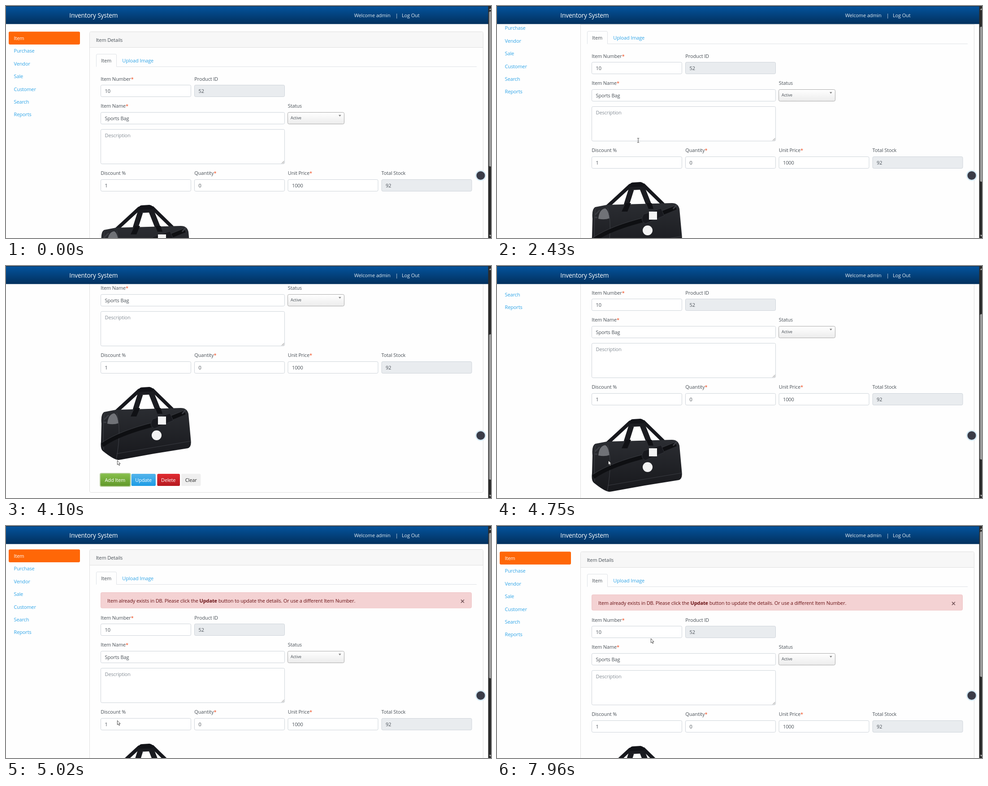
These frames come from a looping animation (1082x518 px, 8 s). An HTML page:

```html
<!DOCTYPE html>
<html lang="en">
<head>
<meta charset="utf-8">
<title>Inventory System</title>
<style>
html, body { margin: 0; width: 100%; height: 100%; overflow: hidden; background: #fefefe; }
svg { display: block; width: 1082px; height: 518px; }
text { font: 11px "Open Sans", "Noto Sans", sans-serif; letter-spacing: -.0127em; fill: #495057; white-space: pre; }
.link { fill: #2fa4e7; }
.white { fill: #fff; }
.pale { fill: #e4ebf2; }
.hint { fill: #868e96; }
.star { fill: #ee4416; }
.dark { fill: #222; }
.title { font-size: 13.75px; fill: #fff; }
.small { font-size: 8.9px; }
.status { font-size: 8.25px; fill: #d4d4d4; }
.warn { fill: #670f12; }
.warn tspan { font-weight: 700; }
</style>
</head>
<body>
<svg id="stage" viewBox="0 0 1082 518"></svg>
<script>
const LOOP = 8000, ALERT_HEIGHT = 47, CLICK = 3790, REPLY = 3850;

// [time, value], each value held until the next
const scrollKeys = [[0, 0], [2430, 51], [2500, 150], [2570, 221], [4750, 150],
  [4820, 86], [4880, 43], [4950, 18], [5010, 5], [5080, 0]];
const statusKeys = [[0, 0], [1720, .5], [1780, .8], [1850, 1], [2100, .8], [2160, .5], [2230, .2], [2290, 0]];

// [start, end, steps, pointer, ...points], going on from the previous point
const moves = [
  [190, 190, 1, 'arrow', [925, 423]],
  [260, 330, 2, 'arrow', [624, 260]],
  [660, 860, 4, 'arrow', [203, 92]],
  [1180, 1310, 3, 'arrow', [149, 77]],
  [1380, 1580, 4, 'hand', [237, 121.5]],
  [1780, 1910, 3, 'arrow', [302, 230]],
  [2100, 2290, 4, 'beam', [315, 300]],
  [2900, 3230, 6, 'arrow', [305, 400], [268, 460]],
  [3300, 3430, 3, 'hand', [250, 434]],
  [REPLY, REPLY, 1, 'arrow', [248, 434]],
  [5220, 6010, 12, 'arrow', [300, 300], [400, 134], [445, 183.5]],
  [6080, 6540, 8, 'arrow', [430, 160], [510, 166], [588, 200]],
  [6810, 7090, 5, 'arrow', [660, 180], [728, 186]],
  [7290, 7430, 3, 'arrow', [353, 253]],
  [7900, 7960, 2, 'arrow', [343, 251]]
];

const text = (x, middle, s, cls = '') => `<text x="${x}" y="${middle + 4}" class="${cls}">${s}</text>`;
const rect = (x, y, w, h, attrs) => `<rect x="${x}" y="${y}" width="${w}" height="${h}" ${attrs}/>`;
const path = (d, attrs) => `<path d="${d}" ${attrs}/>`;
const fade = (id, top, bottom) => `<linearGradient id="${id}" x2="0" y2="1"><stop stop-color="${top}"/>
  <stop offset="1" stop-color="${bottom}"/></linearGradient>`;
const label = (x, y, s, star) => text(x, y, s + (star ? '<tspan class="star">*</tspan>' : ''));
const box = (x, y, w, h, fill = '#fff') => rect(x + .5, y + .5, w - 1, h - 1, `rx="2.8" fill="${fill}" stroke="#ced4da"`);
const field = (x, y, w, s, locked) => box(x, y, w, 27, locked ? '#e9ecef' : '#fff') + text(x + 9.5, y + 13.5, s);
const button = (x, w, textX, s, fill, cls = 'white') => rect(x, 464, w, 27, `rx="2.8" fill="${fill}"`) + text(textX, 477.5, s, cls);

const sidebar = rect(6, 57.3, 159, 28.6, 'rx="2.8" fill="#ff6707"') +
  ['Item', 'Purchase', 'Vendor', 'Sale', 'Customer', 'Search', 'Reports']
    .map((s, i) => text(17.5, 72 + i * 28.4, s, i ? 'link' : 'white')).join('');

const card = rect(186.5, 57.5, 878, 622, 'id="card" rx="3" fill="#fefefe" stroke="#dfdfdf"') +
  path('M187 92V60.5Q187 58 190 58H1061Q1064 58 1064 60.5V92Z', 'fill="#f7f7f7"') +
  path('M187 92.5H1064', 'stroke="#dfdfdf"') + text(200.7, 75.5, 'Item Details') +
  path('M201 135.5H201.5V110Q201.5 107.5 204 107.5H244Q246.5 107.5 246.5 110V135.5H1050', 'fill="none" stroke="#dee2e6"') +
  text(212.3, 122.3, 'Item') + text(259.3, 122.3, 'Upload Image', 'link');

const notice = `<g id="notice">${rect(211.5, 153.5, 827, 34.6, 'rx="2.8" fill="#f4d2d3" stroke="#efc3c5"')}
  ${text(226, 171.5, 'Item already exists in DB. Please click the <tspan>Update</tspan> button to update the details. Or use a different Item Number.', 'warn')}
  ${path('M1015 169.5l7 7m0 -7l-7 7', 'stroke="#75565a" stroke-width="1.6"')}</g>`;

const inputs = label(211.3, 162.5, 'Item Number', 1) + field(211, 176, 202, '10') +
  label(420.3, 162.5, 'Product ID') + field(420, 176, 202, '52', 1) +
  label(211.3, 223.3, 'Item Name', 1) + field(211, 237, 411, 'Sports Bag') +
  label(628.8, 223.3, 'Status') +
  rect(628.5, 237.5, 126, 26, 'rx="3" fill="url(#select)" stroke="#aaa"') + text(635, 249.3, 'Active', 'small') +
  path('M742 243h5.6l-2.8 4z', 'fill="#888"') +
  box(211, 275, 411, 78) + text(220.5, 288.7, 'Description', 'hint') +
  path('M615 351.5l5.5 -5.5M618 351.5l2.5 -2.5', 'stroke="#555" stroke-width=".8"') +
  label(211.3, 373.3, 'Discount %') + field(211, 387, 202, '1') +
  label(420.3, 373.3, 'Quantity', 1) + field(420, 387, 202, '0') +
  label(628.8, 373.3, 'Unit Price', 1) + field(628.5, 387, 202, '1000') +
  label(837.5, 373.3, 'Total Stock') + field(837.5, 387, 202, '92', 1);

const bag = `<g fill="none" stroke-linejoin="round">
  ${path('M246 325L297 278L327 277L371 320', 'stroke="#17181d" stroke-width="8"')}
  ${path('M284 336L301 282L323 281L340 324', 'stroke="#1b1c21" stroke-width="12"')}
  ${path('M296 281V276Q298 271 304 271L320 270Q326 271 328 275V280Z', 'fill="#121318"')}
  ${path('M213 352Q211 330 219 326L245 321L390 317Q404 317 407 330L412.5 390Q414 405 405 407L330 419L252 433Q242 434 216 413Q210 408 212 392Z', 'fill="url(#cloth)"')}
  ${path('M278 336L287 317H299L291 336ZM333 317H345L349 330H338Z', 'fill="#101115"')}
  ${path('M226 352Q228 331 241 329Q248 331 251 351Q240 355 226 352Z', 'fill="#707277"')}
  ${path('M220 329Q216 350 218 410M247 328Q258 366 246 432', 'stroke="#3a3c42" stroke-width="1.2"')}
  ${path('M247 419L412 391', 'stroke="#3a3c42"')}
  ${path('M215 400Q255 372 335 353L399 327', 'stroke="#0e0f12" stroke-width="9"')}
  ${path('M214 394Q255 367 333 348L396 323', 'stroke="#3d3f45" stroke-width=".8"')}
  ${path('M327 342L366 329L373 345L331 363Q318 358 327 342Z', 'fill="#18191e" stroke="#303238"')}
  ${path('M219 343L229 333M217 349h7M393 330l8 -9', 'stroke="#3b3d43" stroke-width="3"')}
  ${rect(339, 336, 18, 18, 'fill="#f3f3f3"')}
  <circle cx="336" cy="378" r="11" fill="#f3f3f3"/></g>`;

const buttons = rect(209, 462, 69.5, 31, 'id="ring" rx="4" fill="#afcb90"') +
  button(211, 65.5, 220.5, 'Add Item', 'url(#green)') +
  rect(211, 464, 65.5, 27, 'id="hover" rx="2.8" fill="#3b6a0c" opacity=".15"') +
  button(279.7, 54.3, 288.3, 'Update', 'url(#blue)') +
  button(337.3, 50.7, 346, 'Delete', 'url(#red)') +
  button(391.2, 43.3, 399.8, 'Clear', '#efefef', 'dark');

const frame = rect(0, 0, 1076, 40.3, 'fill="url(#bar)"') + rect(0, 0, 1082, 1, 'fill="#1c2a3a"') +
  text(141.3, 22, 'Inventory System', 'title') + text(776.7, 21.2, 'Welcome admin', 'pale') +
  text(868.8, 21.2, '|', 'pale') + text(883, 21.2, 'Log Out', 'pale') +
  rect(1075.7, 0, 7, 518, 'fill="#2b2b2b"') + rect(1077.5, 12, 6, 346, 'id="thumb" rx="2.5" fill="#9d9d9d"') +
  path('M1077.5 9l3 -4l3 4zM1077.5 511l3 4l3 -4z', 'fill="#9d9d9d"') +
  '<circle cx="1059" cy="378.5" r="10.8" fill="#3a3c48" stroke="#d5eaf7" stroke-width="2.6"/>';

const status = `<g id="status">${path('M0 502.5H254Q257 502.5 257 505.5V518H0Z', 'fill="#3c3e41"')}
  ${text(0, 510.2, 'mainnode/warehouse-accounting-portal/start.php#goodsReportTab', 'status')}</g>`;

const pointers = `<g id="pointer" stroke-linejoin="round">
  ${path('M.4 .4V9.9L2.6 7.9L4.2 11.5L5.7 10.8L4.2 7.4H7Z', 'id="arrow" fill="#fff" stroke="#222" stroke-width=".8"')}
  ${path('M-1 6.5V1Q0 -.6 1 1V4.6Q2 3.8 2.8 5Q4 4.2 4.5 5.4Q6 5 6 6.6V9Q6 11 4.6 12.3H-.4L-3 8.4Q-3.4 6.6 -1 8Z', 'id="hand" fill="#fff" stroke="#222" stroke-width=".8"')}
  ${path('M-2.2 -4.8H-.7L0 -4.2L.7 -4.8H2.2M0 -4.2V4.2M-2.2 4.8H-.7L0 4.2L.7 4.8H2.2', 'id="beam" fill="none" stroke="#333" stroke-width=".9"')}</g>`;

const $ = id => document.getElementById(id);
$('stage').innerHTML = `<defs>${fade('bar', '#04549e', '#02305d')}${fade('select', '#fff', '#ececec')}
  ${fade('cloth', '#2b2d32', '#17181c')}${fade('green', '#86bf4b', '#62992b')}
  ${fade('blue', '#54b4eb', '#1d9ce5')}${fade('red', '#e12b31', '#b5191f')}</defs>
  <g id="page">${sidebar}${card}${notice}<g id="form">${inputs}
  <g transform="translate(0 174)">${bag}${buttons}</g></g></g>${frame}${status}${pointers}`;

const held = (keys, t) => keys.findLast(k => k[0] <= t)[1];
const show = (id, on) => $(id).style.display = on ? '' : 'none';
const shift = (id, x, y) => $(id).setAttribute('transform', `translate(${x} ${y})`);

function placePointer(t) {
  const i = moves.findLastIndex(m => m[0] <= t);
  show('pointer', i >= 0);
  if (i < 0) return;
  const [start, end, steps, shape, ...points] = moves[i];
  const route = [i ? moves[i - 1].at(-1) : points[0], ...points];
  const step = Math.floor((t - start) / ((end - start) / (steps - 1) || 1) + .1);
  const along = Math.min(1, (step + 1) / steps) * points.length;
  const leg = Math.min(Math.floor(along), points.length - 1);
  const [x, y] = [0, 1].map(a => route[leg][a] + (route[leg + 1][a] - route[leg][a]) * (along - leg));
  shift('pointer', x, y);
  for (const id of ['arrow', 'hand', 'beam']) show(id, id === shape);
}

function render(t) {
  const scroll = held(scrollKeys, t), alerted = t >= REPLY;
  const push = alerted ? ALERT_HEIGHT : 0;
  shift('page', 0, -scroll);
  shift('form', 0, push);
  $('card').setAttribute('height', 622 + push);
  $('thumb').setAttribute('y', 12.3 + scroll * (alerted ? .634 : .667));
  $('thumb').setAttribute('height', alerted ? 324.5 : 346);
  show('notice', alerted);
  show('ring', t >= CLICK);
  show('hover', t >= 3300 && t < REPLY);
  $('status').setAttribute('opacity', held(statusKeys, t));
  placePointer(t);
}

const begin = performance.now();
function tick() {
  render((performance.now() - begin) % LOOP);
  requestAnimationFrame(tick);
}
tick();
</script>
</body>
</html>
```
